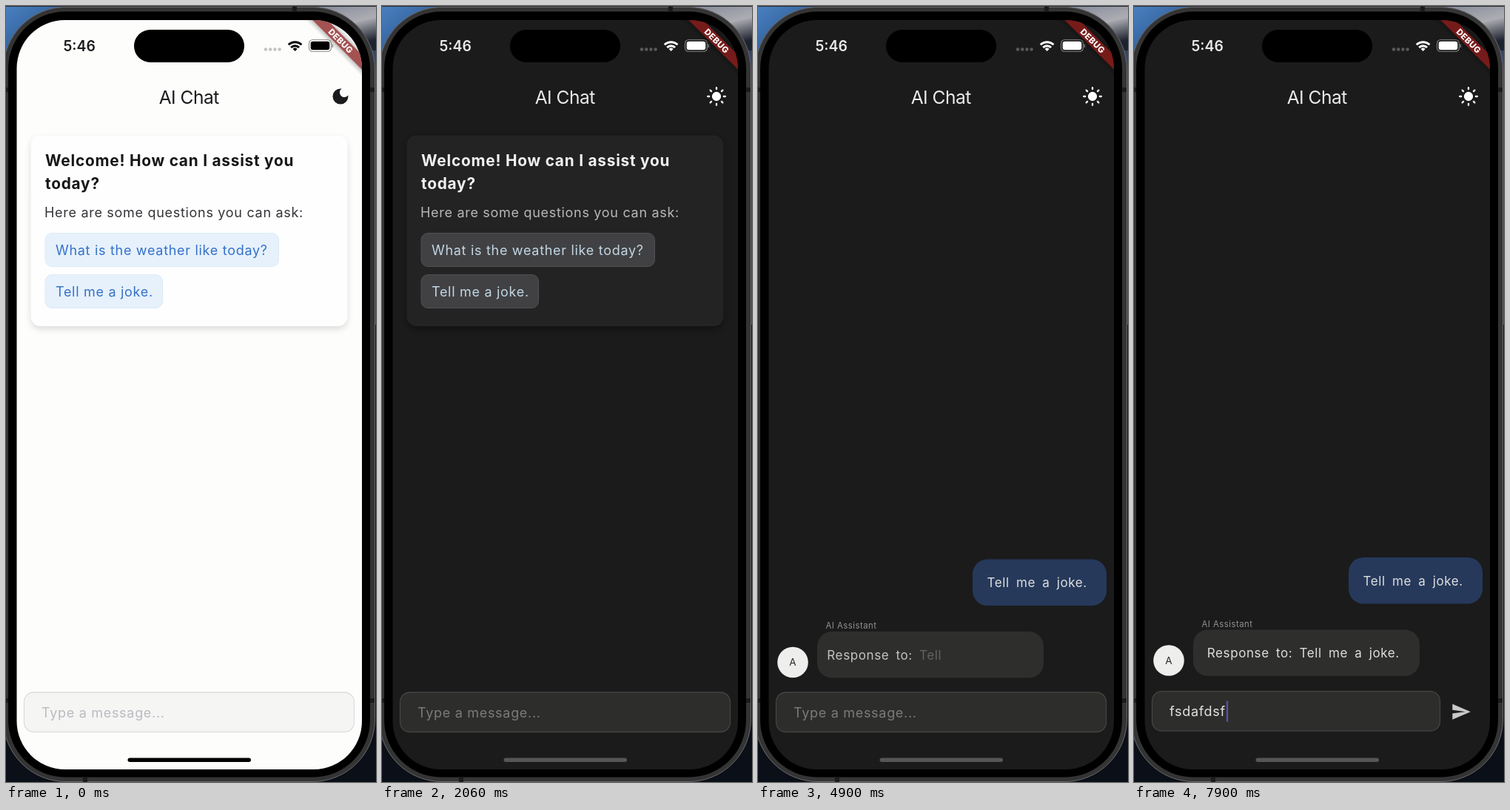
An HTML page for the animation above (8 s loop, 500x1047 px).

```html
<!DOCTYPE html>
<html lang="en">
<head>
<meta charset="utf-8">
<title>AI Chat</title>
<style>
html, body { margin: 0; width: 100%; height: 100%; overflow: hidden; background: #0b0f17; }
svg {
  display: block; width: 100%; height: 100%;
  font-family: Inter, Roboto, sans-serif;
  --bg: #fdfdfc; --fg: #1b1b1d; --icon: #000; --card: #fefefe; --heading: #161618; --sub: #343438;
  --chip: #e6f1fc; --chip-line: #dcebf8; --chip-text: #3571c8;
  --field: #f5f5f4; --line: #dededd; --hint: #b9bbc0; --dots: #c3c3c3;
  --ribbon: #a45151; --home: #000; --shadow: .13;
}
svg.dark {
  --bg: #1b1b1c; --fg: #e9e9e9; --icon: #fff; --card: #232324; --heading: #f1f1f1; --sub: #b8b8b8;
  --chip: #414143; --chip-line: #505052; --chip-text: #c2d7e4;
  --field: #2d2d2b; --line: #434341; --hint: #7b7b7b; --dots: #5a5a5a;
  --ribbon: #761b19; --home: #565656; --shadow: .35;
}
.body { font-size: 18px; letter-spacing: .7px; }
.words { font-size: 17px; letter-spacing: .6px; word-spacing: 3.9px; fill: #dedede; }
.chip rect { fill: var(--chip); stroke: var(--chip-line); }
.chip text { fill: var(--chip-text); }
svg:not(.dark) #sun, svg.dark #moon { display: none; }
</style>
</head>
<body>
<svg id="stage" viewBox="0 0 500 1047">
  <defs>
    <linearGradient id="sky" x2=".7" y2="1">
      <stop stop-color="#4a80c0"/><stop offset=".5" stop-color="#2f5c96"/><stop offset="1" stop-color="#14233a"/>
    </linearGradient>
    <linearGradient id="haze" x2=".4" y2="1">
      <stop stop-color="#7d8496"/><stop offset=".55" stop-color="#adadb3"/><stop offset="1" stop-color="#1c2330"/>
    </linearGradient>
    <filter id="blur" x="-20%" y="-40%" width="140%" height="180%"><feGaussianBlur stdDeviation="4"/></filter>
    <clipPath id="screen"><rect x="14.5" y="19" width="466.5" height="1011" rx="65"/></clipPath>
  </defs>

  <!-- Desktop corners and phone body -->
  <rect width="500" height="1047" fill="#0b0f17"/>
  <rect width="100" height="110" fill="url(#sky)"/>
  <rect x="400" width="100" height="60" fill="url(#haze)"/>
  <rect x="490" y="60" width="10" height="370" fill="#37456a"/>
  <rect width="500" height="1" fill="#2c2c2e"/>
  <rect x="-3.5" y="1.5" width="502" height="1045" rx="84" fill="#343435" stroke="#69696b"/>
  <path d="M-1 113h4M-1 937h4M107 1041v6M390 1v6M491 113h7M491 937h7" stroke="#1b1b1c" stroke-width="6"/>
  <rect x="3" y="7.500" width="489" height="1033" rx="77" fill="#000"/>

  <g clip-path="url(#screen)">
    <rect x="14" y="18" width="468" height="1013" fill="var(--bg)"/>

    <!-- Status bar -->
    <text x="77.500" y="61" font-size="19.400" font-weight="600" fill="var(--fg)">5:46</text>
    <rect x="173" y="32" width="149" height="44" rx="22" fill="#000"/>
    <path d="M351 58.500h.01m6.200 0h.01m6.200 0h.01m6.200 0h.01" stroke="var(--dots)" stroke-width="4.400" stroke-linecap="round"/>
    <g fill="none" stroke="var(--icon)" stroke-width="3">
      <path d="M381.800 52.300a12.600 12.600 0 0 1 17.600 0M385.200 56a7.700 7.700 0 0 1 10.800 0"/>
      <path d="M390.600 61l-3-3.100a4.300 4.300 0 0 1 6 0z" fill="var(--icon)" stroke="none"/>
    </g>
    <rect x="409.500" y="45.500" width="30" height="16" rx="5" fill="none" stroke="var(--icon)" stroke-opacity=".4" stroke-width="1.200"/>
    <rect x="411.700" y="47.700" width="25.600" height="11.600" rx="3.200" fill="var(--icon)"/>
    <path d="M441.300 51.500v4.500" stroke="var(--icon)" stroke-opacity=".4" stroke-width="1.600"/>

    <!-- Title bar -->
    <text x="247.200" y="132" font-size="24.500" letter-spacing="-.5" text-anchor="middle" fill="var(--fg)">AI Chat</text>
    <path id="moon" transform="translate(438 108) scale(1.165)" fill="var(--fg)" d="M12 3a9 9 0 1 0 9 9c0-.46-.04-.92-.1-1.360A5.400 5.400 0 1 1 13.360 3.100 9 9 0 0 0 12 3z"/>
    <g id="sun" transform="translate(452 122)" fill="#fff" stroke="#fff" stroke-width="2.300" stroke-linecap="round">
      <circle r="5"/>
    </g>

    <!-- Welcome card -->
    <g id="welcome">
      <rect x="33.500" y="178" width="428" height="258" rx="13" fill="#000" opacity="var(--shadow)" filter="url(#blur)"/>
      <rect x="33.500" y="174.500" width="428" height="257.500" rx="13" fill="var(--card)"/>
      <g font-size="20.800" font-weight="700" letter-spacing=".78" fill="var(--heading)">
        <text x="53" y="216">Welcome! How can I assist you</text>
        <text x="53" y="246.500">today?</text>
      </g>
      <g class="body">
        <text x="52" y="285" fill="var(--sub)">Here are some questions you can ask:</text>
        <g class="chip">
          <rect x="53" y="306.500" width="315.500" height="45" rx="9"/>
          <text x="67" y="335.500">What is the weather like today?</text>
        </g>
        <g class="chip">
          <rect x="53" y="362.500" width="158.500" height="45" rx="9"/>
          <text x="67" y="391.500">Tell me a joke.</text>
        </g>
      </g>
    </g>

    <!-- Messages -->
    <g id="question">
      <rect x="290" y="844" width="181" height="62.500" rx="20" fill="#26395b"/>
      <text id="questionText" class="words" x="309.500" y="881.500"></text>
    </g>
    <g id="answer">
      <text x="91.500" y="840" font-size="11.300" letter-spacing=".5" fill="#929292">AI Assistant</text>
      <rect x="80" y="844" width="306" height="62.500" rx="20" fill="#2e2e2c"/>
      <circle cx="47" cy="885.500" r="20.800" fill="#eeeeec"/>
      <text x="47" y="890.300" font-size="13.500" text-anchor="middle" fill="#2a2a2a">A</text>
      <text id="answerText" class="words" x="98.800" y="881.500"></text>
    </g>

    <!-- Input -->
    <g id="input">
      <rect id="field" x="24.500" y="926" width="446" height="53.500" rx="13" fill="var(--field)" stroke="var(--line)" stroke-width="1.300"/>
      <text id="entry" class="body" x="48" y="959.500"></text>
      <rect id="caret" y="939" width="2.400" height="28" fill="#5d4f9e"/>
      <path id="send" transform="translate(428 939.500) scale(1.165)" fill="#c9c9c8" d="M2 21L23 12 2 3V10l15 2-15 2z"/>
    </g>
    <rect x="164.500" y="1014.500" width="166.500" height="5.500" rx="2.750" fill="var(--home)"/>

    <!-- Corner ribbon -->
    <g transform="translate(481 18.500) rotate(45)">
      <rect x="-60" y="34" width="120" height="14" fill="#000" opacity=".45" filter="url(#blur)"/>
      <rect x="-60" y="33.500" width="120" height="14" fill="var(--ribbon)"/>
      <text y="44.700" font-size="11.400" font-weight="800" letter-spacing=".4" text-anchor="middle" fill="#fff">DEBUG</text>
    </g>
  </g>
</svg>
<script>
const LOOP = 8000;
const ASKED = 3800, ANSWERED = 4730, FOCUSED = 7230, TYPED = 7530;
const WORD_STEP = 68, WORD_FADE = 100, SLIDE = 7.5;
// Each theme change first shows the previous theme's field border.
const themes = [
  [0, false], [360, true, '#aeaea8'], [430, true],
  [1600, false, '#b4b4b2'], [1760, false],
  [2000, true, '#b3b3ad'], [2060, true]
];
const entries = [
  [0, ''], [TYPED, 'f'], [7570, 'fsd'], [7620, 'fsda'], [7660, 'fsdaf'],
  [7830, 'fsdafd'], [7900, 'fsdafdsf']
];

const $ = id => document.getElementById(id);
const clamp = v => Math.max(0, Math.min(1, v));
const latest = (list, t) => list.filter(([start]) => start <= t).pop();
const show = (id, on) => $(id).setAttribute('display', on ? 'inline' : 'none');
const move = (id, x, y) => $(id).setAttribute('transform', `translate(${x} ${y})`);
const svgNode = name => document.createElementNS('http://www.w3.org/2000/svg', name);

function addWords(id, text) {
  for (const word of text.split(' ')) {
    const span = svgNode('tspan');
    span.textContent = word + ' ';
    $(id).append(span);
  }
}

// Words fade in one by one while the whole line slides and brightens.
function revealWords(id, elapsed, duration) {
  const progress = clamp(elapsed / duration);
  [...$(id).children].forEach((span, i) =>
    span.setAttribute('fill-opacity', clamp((elapsed - i * WORD_STEP) / WORD_FADE)));
  $(id).setAttribute('opacity', .8 + .2 * progress);
  move(id, -SLIDE * (1 - progress), 0);
}

function draw(t) {
  const [, dark, border] = latest(themes, t);
  $('stage').classList.toggle('dark', dark);
  $('field').style.stroke = border || '';

  const typing = t >= TYPED;
  const lift = typing ? -2.5 : 0;
  show('welcome', t < ASKED);
  show('question', t >= ASKED);
  show('answer', t >= ANSWERED);
  move('question', 0, lift - (t >= ANSWERED ? 97.5 : 0));
  move('answer', 0, lift);
  revealWords('questionText', t - ASKED, 360);
  revealWords('answerText', t - ANSWERED, 630);

  const text = latest(entries, t)[1];
  const entry = $('entry');
  entry.textContent = text || 'Type a message...';
  entry.style.fill = text ? '#e2e2e2' : 'var(--hint)';
  move('input', 0, typing ? -1.3 : 0);
  $('field').setAttribute('width', typing ? 389 : 446);
  show('send', typing);
  show('caret', t >= FOCUSED);
  $('caret').setAttribute('x', 48 + (text ? entry.getComputedTextLength() + 1 : 0));
}

for (let i = 0; i < 8; i++) {
  const ray = svgNode('path');
  ray.setAttribute('d', 'M0-9.800v-2');
  ray.setAttribute('transform', `rotate(${i * 45})`);
  $('sun').append(ray);
}
addWords('questionText', 'Tell me a joke.');
addWords('answerText', 'Response to: Tell me a joke.');

function tick() {
  draw(performance.now() % LOOP);
  requestAnimationFrame(tick);
}
tick();
</script>
</body>
</html>
```
